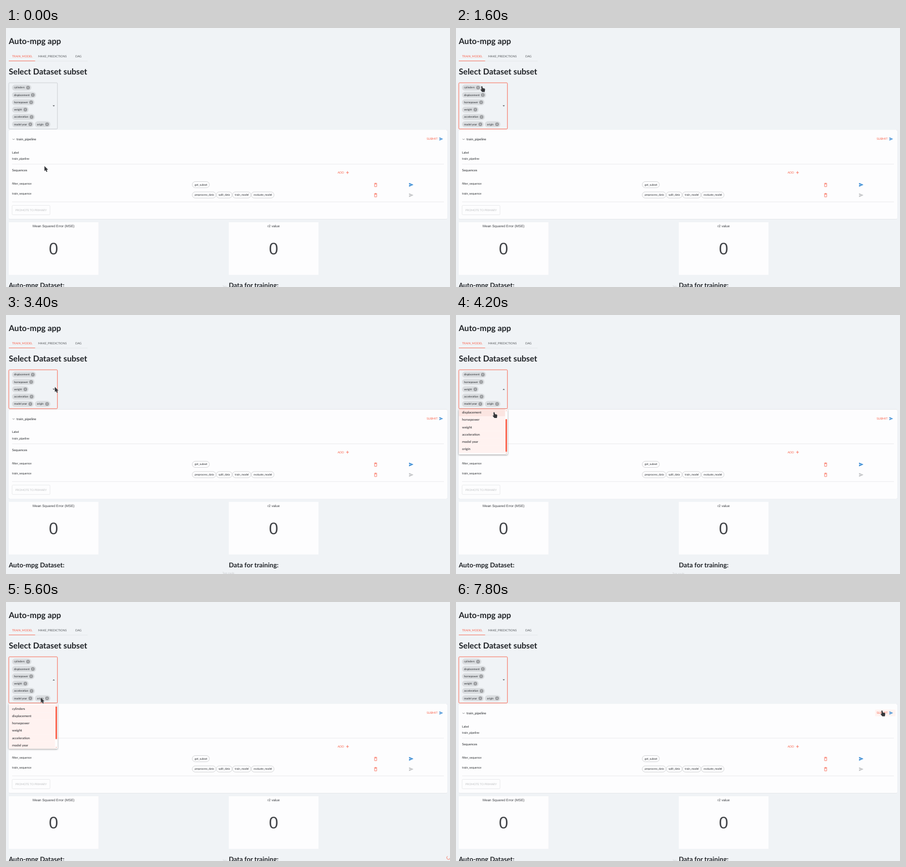
An HTML page that plays this animation: 800x468 px, repeating every 8 s.

```html
<!DOCTYPE html>
<html lang="en">
<head>
<meta charset="utf-8">
<title>Auto-mpg app</title>
<style>
  html, body { margin: 0; width: 100%; height: 100%; overflow: hidden; background: #f0f3f6; }
  svg { display: block; width: 100%; height: 100%; font-family: Lato, sans-serif; text-rendering: geometricPrecision; }
  .card { filter: drop-shadow(0 .7px .6px rgba(0, 0, 0, .3)); }
  .popup { filter: drop-shadow(0 1.5px 1.5px rgba(0, 0, 0, .4)); }
</style>
</head>
<body>
<svg id="stage" viewBox="0 0 800 468"></svg>
<script>
const LOOP = 8000, STEP = 200, ROW = 13.25;
const RED = '#f9624c', BLUE = '#2c84d2', INK = '#1f2226', GRAY = '#bfc1c3';
const SANS = "font-family='Liberation Sans, sans-serif' text-anchor='middle'";

// Column name and x of its delete icon in the chip list.
const COLUMNS = [
  ['cylinders', 39.7], ['displacement', 48.3], ['horsepower', 45.3], ['weight', 34.8],
  ['acceleration', 46], ['model year', 43.8], ['origin', 74]
];

// Pointer stops: time, x, y of the tip.
const PATH = [
  [0, 69.3, 249.5], [200, 69.3, 249.5], [1200, 46.5, 105], [2500, 46.5, 105],
  [3300, 88, 129.7], [3600, 88, 131], [4200, 68.5, 175.5], [5000, 65, 175],
  [5400, 62.8, 173], [6200, 62.8, 173], [6400, 300, 112], [6700, 480, 156],
  [7200, 480, 156], [7700, 767.5, 196], [8000, 767.5, 196]
];

const within = (t, a, b) => t >= a && t < b;
const text = (x, y, size, value, fill = INK, extra = '') =>
  `<text x="${x}" y="${y}" font-size="${size}" fill="${fill}" ${extra}>${value}</text>`;
const heading = (x, y, size, value) => text(x, y, size, value, INK, 'font-weight="700"');
const rect = (x, y, w, h, fill, extra = '') =>
  `<rect x="${x}" y="${y}" width="${w}" height="${h}" fill="${fill}" ${extra}/>`;
const path = (d, fill, extra = '') => `<path d="${d}" fill="${fill}" ${extra}/>`;
const line = (d, stroke, width) => path(d, 'none', `stroke="${stroke}" stroke-width="${width}"`);
const group = (x, y, body, extra = '') => `<g transform="translate(${x} ${y})" ${extra}>${body}</g>`;

function pointerAt(t) {
  const i = Math.max(1, PATH.findIndex(p => p[0] > t));
  const [a, b] = [PATH[i - 1], PATH[i]];
  const k = (t - a[0]) / (b[0] - a[0]), ease = k * k * (3 - 2 * k);
  return [a[1] + (b[1] - a[1]) * ease, a[2] + (b[2] - a[2]) * ease];
}

function pointer(t) {
  const hand = within(t, 1200, 2600) || within(t, 4000, 5200) || t >= 7600;
  const shape = hand
    ? 'M-1 .8Q0-.8 1 .8L1.6 3.8 4.6 4.2Q6 4.6 5.8 6.5L5.2 10.6H.6L-2.2 7Q-2.6 5.6-.6 6.2Z'
    : 'M0 0V9L2 7.3 3.5 10.5 5.2 9.8 3.8 6.7 6.4 6.4Z';
  return group(...pointerAt(t), path(shape, '#35373a', 'stroke="#d8dadc" stroke-width=".5" paint-order="stroke"'));
}

function header() {
  return heading(5, 29, 14.75, 'Auto-mpg app')
    + text(11, 52.8, 5.25, 'TRAIN_MODEL', RED)
    + text(58, 52.8, 5.25, 'MAKE_PREDICTIONS', '#55585c')
    + text(125, 52.8, 5.25, 'DAG', '#55585c')
    + line('M5 59.8H147', '#d9dce0', .5) + line('M5 59.5H52.5', RED, .8)
    + heading(5, 84.3, 14.75, 'Select Dataset subset');
}

function columnChip([name, iconX], y, x) {
  const cross = `M${iconX - 1.2} ${y - 1.2}l2.4 2.4m0-2.4l-2.4 2.4`;
  return rect(x, y - 5.4, iconX + 6 - x, 10.8, '#dadde0', 'rx="5.4"')
    + text(x + 3.7, y + 1.7, 4.875, name)
    + `<circle cx="${iconX}" cy="${y}" r="3.3" fill="#97999c"/>` + line(cross, '#dadde0', .7);
}

function selector(columns, focused, open) {
  const rows = columns.length - 1, height = 4 + rows * ROW, mid = 99 + height / 2;
  const tip = open ? -1 : 1;
  return rect(5, 99, 87.7, height, 'none',
      `rx="1.6" stroke="${focused ? RED : '#bfc3c7'}" stroke-width="${focused ? .9 : .7}"`)
    + columns.map((c, i) => columnChip(c, 107.7 + Math.min(i, rows - 1) * ROW, i === rows ? 52 : 10.8)).join('')
    + path(`M84 ${mid - tip}h4l-2 ${2 * tip}z`, '#505357');
}

const send = (x, y, scale, fill) =>
  group(x, y, path('M-10-9 11 0-10 9V2L5 0-10-2Z', fill, `transform="scale(${scale})"`));

const trash = y => group(666, y,
  line('M-1.9-1.8V3H1.9V-1.8Z', RED, .75) + line('M-2.7-2.9H2.7M-1-3.3H1', RED, .75));

const taskChip = (x, right, y, name) =>
  rect(x, y - 5.6, right - x, 11.2, '#fdfdfe', 'rx="5.6" stroke="#aeb0b2" stroke-width=".5"')
  + text(x + 4.3, y + 1.6, 4.875, name);

function pipeline(hover) {
  return rect(5, 184, 790, 161.3, '#fdfdfe', 'rx="1.5" class="card"')
    + line('M11.8 200.2l1.8 1.8 1.8-1.8', '#606366', .7)
    + text(19, 202.8, 6, 'train_pipeline')
    + (hover ? rect(755, 194.5, 37, 12, '#fff3f1', 'rx="1.5"') : '')
    + text(758, 202.3, 5.25, 'SUBMIT', RED) + send(784, 200.5, .315, BLUE)
    + text(11, 226.6, 5.3, 'Label') + text(11, 237.9, 5.25, 'train_pipeline')
    + line('M11 246H789M11 314.2H789', '#dedfe1', .6)
    + text(11, 258.8, 5.8, 'Sequences')
    + text(597.5, 262.9, 5.25, 'ADD', RED) + line('M612.8 261.2h5m-2.5-2.5v5', RED, .8)
    + text(11, 282.8, 5.25, 'filter_sequence') + text(11, 301.4, 5.25, 'train_sequence')
    + taskChip(335.6, 366.5, 283.1, 'get_subset')
    + taskChip(335.6, 378.2, 301.7, 'preprocess_data')
    + taskChip(378.8, 407.4, 301.7, 'split_data')
    + taskChip(408, 441.3, 301.7, 'train_model')
    + taskChip(441.9, 483, 301.7, 'evaluate_model')
    + trash(283.7) + trash(302.2)
    + send(730, 283.3, .375, BLUE) + send(730, 302, .375, '#bdbfc1')
    + rect(11, 320.5, 68.3, 17, 'none', 'rx="1.5" stroke="#d6d8da" stroke-width=".5"')
    + text(17, 330.9, 5.1, 'PROMOTE TO PRIMARY', GRAY);
}

const metric = (x, title) => rect(x, 351, 161.5, 95, '#fdfdfe')
  + text(x + 80.7, 360.2, 6.2, title, '#3c3f43', SANS)
  + text(x + 80.5, 409.3, 30, '0', '#404246', SANS);

function popup(t, scroll, selected) {
  const hovered = within(t, 4200, 4600) ? 1 : within(t, 4600, 5200) ? 0 : -1;
  const items = COLUMNS.map(([name], i) => {
    const y = 3 + i * ROW - scroll;
    const fill = i === hovered ? (i ? '#fbe5e1' : '#f4f4f5') : selected(i) ? '#fff2f0' : '#fefefe';
    return rect(0, y, 83.5, ROW + .1, fill) + text(6, y + 8.5, 6, name);
  }).join('');
  const thumbY = 5.5 + scroll * .77;
  return rect(0, 0, 88, 82, '#fefefe', 'rx="1.5" class="popup"')
    + `<clipPath id="list"><rect width="88" height="82"/></clipPath><g clip-path="url(#list)">${items}</g>`
    + rect(84.2, thumbY, 2.8, 59, RED, 'rx=".6"')
    + path('M84.6 3.4h2l-1-1.2zM84.6 79h2l-1 1.2z', RED);
}

function draw(t) {
  const removed = within(t, 1800, 5200);
  const shift = removed ? -ROW : 0;
  const open = within(t, 3800, 6600);
  const fade = open ? 1 : within(t, 6600, 6820) ? (6820 - t) / 220 : 0;
  const scroll = t < 4400 ? 16.5 : t < 4600 ? 8 : 0;
  const lower = pipeline(t >= 7600) + metric(5, 'Mean Squared Error (MSE)') + metric(401.5, 'r2 value')
    + heading(5, 469.2, 11.85, 'Auto-mpg Dataset:') + heading(401.5, 469.2, 11.85, 'Data for training:');
  const spin = t / 1400 * 360;

  return header()
    + selector(removed ? COLUMNS.slice(1) : COLUMNS, t >= 1600, open)
    + group(0, shift, lower)
    + (removed ? text(390, t < 3800 ? 467.7 : 468.8, 4.6, 'Tags mode', '#c9cbce')
               : text(390, 467.8, 4.2, 'Tags', '#d3d5d8'))
    + (fade ? group(5, 183.2 + shift, popup(t, scroll, i => i > 0 || !removed), `opacity="${fade}"`) : '')
    + (within(t, 5400, 6400)
      ? group(797.3, 462, `<g transform="rotate(${spin})">${line('M3.2 0A3.2 3.2 0 1 1-1.6-2.77', RED, .8)}</g>`) : '')
    + pointer(t);
}

const stage = document.getElementById('stage');
const start = performance.now();
let shown = -1;
function tick() {
  const t = Math.floor((performance.now() - start) % LOOP / STEP) * STEP;
  if (t !== shown) stage.innerHTML = draw(shown = t);
  requestAnimationFrame(tick);
}
tick();
</script>
</body>
</html>
```
